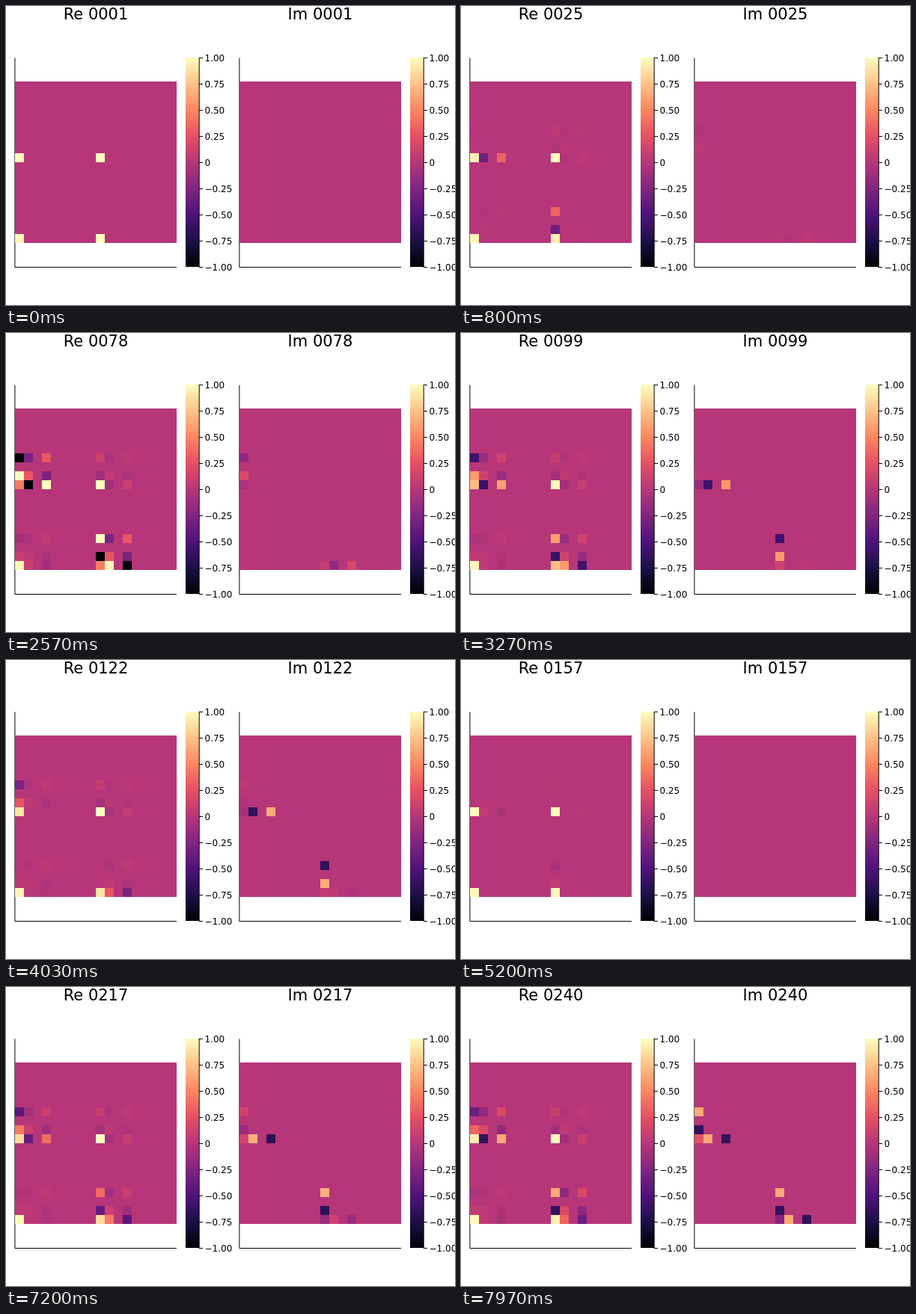
An HTML page with a canvas that plays this animation: 600x400 px, repeating every 8000 ms.

```html
<!DOCTYPE html>
<html>
<head>
<meta charset="utf-8">
<style>
  html, body { margin: 0; width: 100%; height: 100%; overflow: hidden; background: #fff; }
  canvas { display: block; }
</style>
</head>
<body>
<canvas id="stage" width="600" height="400"></canvas>
<script>
const ctx = document.getElementById('stage').getContext('2d');
const LOOP = 8000, SIZE = 18, HALF = SIZE / 2, CELL = 12, TOP = 69, BOTTOM = 349;
const FONT = '"DejaVu Sans", sans-serif';
const MAGMA = ['#000004', '#1c1046', '#4f127b', '#812581', '#b63679',
               '#e55063', '#fb8761', '#fec287', '#fcfdbf'];
const RGB = MAGMA.map(hex => [1, 3, 5].map(i => parseInt(hex.slice(i, i + 2), 16)));

// Key points of the excitation; the phases are in degrees.
const KEYS = [
  { at: 0, size: 0, edge: 75, inner: 180 },
  { at: 46, size: 0.65, edge: 75, inner: 180 },
  { at: 77, size: 1, edge: 10, inner: 180 },
  { at: 121, size: 0.65, edge: -8, inner: 270 },
  { at: 131, size: 0.06, edge: 0, inner: 360 },
  { at: 166, size: 0.67, edge: 18, inner: 467 },
  { at: 189, size: 0.9, edge: -61, inner: 495 }
];

const mix = (a, b, k) => a + (b - a) * k;
const clamp = (x, low, high) => Math.max(low, Math.min(high, x));
const polar = (size, degrees) =>
  [Math.cos, Math.sin].map(f => size * f(degrees * Math.PI / 180));

// The matrix rests for 25 steps in every later cycle of 75.
const activeSteps = step => step - clamp(step - 126, 0, 25) - clamp(step - 201, 0, 25);

function excitation(step) {
  const time = activeSteps(step);
  const i = clamp(KEYS.findIndex(key => key.at > time), 1, KEYS.length - 1);
  const [a, b] = time >= KEYS.at(-1).at ? KEYS.slice(-2) : [KEYS[i - 1], KEYS[i]];
  const k = (time - a.at) / (b.at - a.at);
  return ['size', 'edge', 'inner'].map(name => mix(a[name], b[name], k));
}

function color(value) {
  const x = (clamp(value, -1, 1) + 1) * 4;
  const i = Math.min(7, Math.floor(x));
  return `rgb(${RGB[i].map((a, j) => Math.round(mix(a, RGB[i + 1][j], x - i)))})`;
}

// Lower triangle of the Hermitian matrix as [row, column, real, imaginary].
function entries(step) {
  const [size, edgePhase, innerPhase] = excitation(step);
  const [v, vi] = polar(size ** 3, edgePhase);
  const [w, wi] = polar(size, innerPhase);
  const both = size ** 4;
  const list = [
    [0, 0, 0.97, 0], [HALF, HALF, 1, 0],
    [HALF, 0, 1 - 0.15 * size + 0.4 * (v * w - vi * wi), 0.4 * (v * wi + vi * w)]
  ];
  // The two modes carry opposite signs.
  const modes = [[1, 1], [3, -1]];
  for (const [m, sign] of modes) {
    list.push([m, 0, sign * 0.1 * both, 0],
              [HALF + m, HALF, -sign * 0.1 * size, 0],
              [HALF + m, 0, sign * v, sign * vi],
              [HALF, m, sign * w, sign * wi]);
    for (const [n, other] of modes) {
      const s = sign * other;
      list.push([HALF + m, n, s * 0.28 * both, 0]);
      if (m >= n) list.push([m, n, s * 0.05 * size, 0],
                            [HALF + m, HALF + n, s * 0.05 * size, 0]);
    }
  }
  return list;
}

function drawCell(row, col, value) {
  ctx.fillStyle = color(value);
  ctx.fillRect(12 + col * CELL, 317 - (row + 1) * CELL, CELL, CELL);
}

function line(...points) {
  ctx.beginPath();
  points.forEach(([x, y]) => ctx.lineTo(x, y));
  ctx.stroke();
}

function drawColorbar() {
  const gradient = ctx.createLinearGradient(0, BOTTOM, 0, TOP);
  MAGMA.forEach((hex, i) => gradient.addColorStop(i / 8, hex));
  ctx.fillStyle = gradient;
  ctx.fillRect(240, TOP, 18, BOTTOM - TOP);
  line([258.2, TOP], [258.2, BOTTOM + 1]);
  ctx.fillStyle = '#000';
  ctx.font = '12px ' + FONT;
  ctx.textAlign = 'left';
  for (let i = 0; i <= 8; i++) {
    const value = 1 - i / 4, y = TOP + 0.5 + i * 35;
    line([258, y], [263, y]);
    ctx.fillText(value ? value.toFixed(2).replace('-', '\u2212') : '0', 265.5, y + 4.2);
  }
}

function drawPanel(left, name, step, cells, imaginary) {
  ctx.save();
  ctx.translate(left, 0);
  line([11.9, TOP + 0.5], [11.9, BOTTOM + 0.5], [228, BOTTOM + 0.5]);
  ctx.fillStyle = color(0);
  ctx.fillRect(12, 101, SIZE * CELL, SIZE * CELL);
  for (const [row, col, re, im] of cells) {
    drawCell(row, col, imaginary ? im : re);
    if (row !== col) drawCell(col, row, imaginary ? -im : re);
  }
  drawColorbar();
  ctx.font = '21px ' + FONT;
  ctx.textAlign = 'center';
  ctx.fillText(`${name} ${String(step + 1).padStart(4, '0')}`, 120, 18.3);
  ctx.restore();
}

function draw(now) {
  // Steps last a thirtieth of a second, rounded to hundredths.
  const step = Math.min(239, Math.floor((Math.floor((now % LOOP) / 10) + 0.5) * 0.3));
  const cells = entries(step);
  ctx.fillStyle = '#fff';
  ctx.fillRect(0, 0, 600, 400);
  drawPanel(0, 'Re', step, cells, false);
  drawPanel(300, 'Im', step, cells, true);
}

const start = performance.now();
function tick() {
  draw(performance.now() - start);
  requestAnimationFrame(tick);
}
tick();
</script>
</body>
</html>
```
